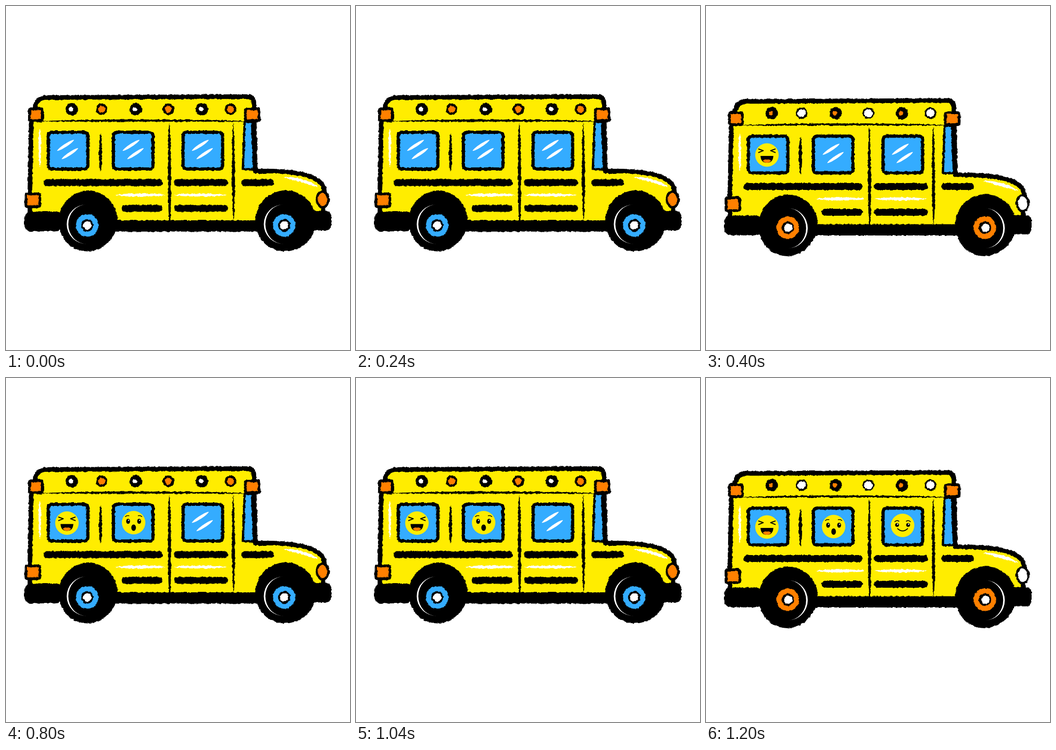
Write an HTML page that moves like this. It is 748 px wide and 748 px high and loops after 1600 ms.

```html
<!DOCTYPE html>
<html lang="en">
<head>
<meta charset="utf-8">
<title>School bus</title>
<style>
  html, body { margin: 0; width: 100%; height: 100%; overflow: hidden; background: #fff; }
  svg { display: block; width: 100vw; height: 100vh; }
</style>
</head>
<body>
<svg id="stage" viewBox="0 0 748 748"></svg>
<script>
const YELLOW = '#ffed00', BLUE = '#34acff', ORANGE = '#ff8000', WHITE = '#fff', BLACK = '#000';
const STEP = 400, DROP = 8.5;

const path = (d, fill, extra = '') => `<path d="${d}" fill="${fill}" ${extra}/>`;
const line = (d, width, color = BLACK) =>
  path(d, 'none', `stroke="${color}" stroke-width="${width}" stroke-linecap="round" stroke-linejoin="round"`);
const oval = (x, y, rx, ry, fill, extra = '') =>
  `<ellipse cx="${x}" cy="${y}" rx="${rx}" ry="${ry}" fill="${fill}" ${extra}/>`;
const disc = (x, y, r, fill) => oval(x, y, r, r, fill);
const box = (x, y, w, h, r, fill, border = 0) =>
  `<rect x="${x}" y="${y}" width="${w}" height="${h}" rx="${r}" fill="${fill}" stroke="${BLACK}" stroke-width="${border}"/>`;

// Brush mark that keeps its width along most of its length and tapers at both ends.
function brush(x1, y1, x2, y2, width, color = BLACK, bow = 0) {
  const dx = x2 - x1, dy = y2 - y1, length = Math.hypot(dx, dy);
  const at = (t, offset) => `${x1 + dx * t - dy / length * offset} ${y1 + dy * t + dx / length * offset}`;
  const side = width * 2 / 3;
  return path(`M${x1} ${y1}C${at(.12, bow + side)} ${at(.88, bow + side)} ${x2} ${y2}` +
    `C${at(.88, bow - side)} ${at(.12, bow - side)} ${x1} ${y1}Z`, color);
}

function body(lit) {
  const lamps = [143, 208, 282, 353, 426, 488].map((x, i) => {
    const small = i % 2 === 0;
    const color = small === lit ? ORANGE : WHITE;
    const radius = small ? 4.8 : lit ? 9 : 7.5;
    return disc(x, 224.5, small ? 13.5 : 12.5, BLACK) + disc(small ? x - 2 : x, 224.5, radius, color);
  }).join('');
  const panes = [92, 233.5, 385].map(x => box(x, 274.5, 86, 80, 8, BLUE, 7)).join('');
  const strips = [[89, 333, 384], [373, 475, 384], [519, 575, 384], [259, 333, 440], [373, 475, 440]]
    .map(([x1, x2, y]) => line(`M${x1} ${y}H${x2}`, 15)).join('');
  return path('M52 460V400L55 250L63 236V222Q66 201 84 199L290 198L525 197Q539 198 539 212' +
      'L542 359H580Q652 361 678 379Q695 392 692 412L688 460L540 478H240Z', YELLOW,
      `stroke="${BLACK}" stroke-width="10" stroke-linejoin="round"`) +
    path('M519 252H535L539 355H515Z', BLUE, `stroke="${BLACK}" stroke-width="5" stroke-linejoin="round"`) +
    brush(76, 251, 525, 251, 5, BLACK, -2.5) +
    lamps + panes + strips +
    brush(205.5, 277, 205.5, 359, 7) +
    brush(355, 254, 356, 490, 6.5) +
    brush(494, 254, 495, 468, 6.5) +
    brush(73.5, 267, 73.5, 351, 5.5, WHITE) +
    brush(239, 411, 347, 411, 6.5, WHITE) +
    brush(365, 411, 480, 411, 6.5, WHITE) +
    brush(603, 373, 679, 394, 6.5, WHITE, -5) +
    box(51, 223.5, 28, 26, 3, ORANGE, 6) +
    box(520.5, 223.5, 30, 26, 3, ORANGE, 6) +
    box(43.5, 408.5, 30, 28, 3, ORANGE, 6) +
    oval(688.5, 420.5, 12.5, 17, lit ? WHITE : ORANGE, `stroke="${BLACK}" stroke-width="5"`) +
    disc(179, 466, 64, BLACK) + disc(608, 467, 66, BLACK) +
    box(225, 466, 335, 24.5, 6, BLACK) +
    box(40, 447, 82, 43, 14, BLACK) +
    box(650, 446, 58, 42, 13, BLACK);
}

const wheel = (x, lit) => lit
  ? disc(x, 483, 61, BLACK) + disc(x + 1.5, 482, 24.5, ORANGE) + disc(x + 1.5, 482, 13.5, BLACK) + disc(x + 2.5, 482, 9, WHITE)
  : disc(x, 472.5, 61, BLACK) + disc(x, 477, 24.5, BLUE) + disc(x, 477, 13.5, BLACK) + disc(x, 477, 9, WHITE);

const tyreShine = (x, lit) => lit
  ? path(`M${x} 439.5A43.5 43.5 0 0 1 ${x} 527A40 43.5 0 0 0 ${x} 439.5Z`, WHITE)
  : path(`M${x - 2} 431.5A43.5 43 0 0 0 ${x - 2} 517.5A40 43 0 0 1 ${x - 2} 431.5Z`, WHITE);

const glint = x => brush(x - 20, 315, x + 17, 291, 6.5, WHITE) + brush(x - 10, 333, x + 26, 309, 6.5, WHITE);

// Faces are drawn around their own centre.
const faces = [
  line('M-18 -13L-8 -9.5L-18 -5.5M18 -13L8 -9.5L18 -5.5', 2.2) +
    path('M-14 2H14Q13 17 0 17T-14 2Z', BLACK) +
    path('M-9 12.5Q-5 8 0 10Q5 8 9 12.5Q5 17 0 17T-9 12.5Z', ORANGE),
  oval(-12, -3, 4.2, 5.5, BLACK) + oval(12, -3, 4.2, 5.5, BLACK) +
    disc(-11, -5, 1.3, WHITE) + disc(13, -5, 1.3, WHITE) +
    oval(0, 11, 5, 7, BLACK) +
    line('M-18 -13Q-15 -16 -10 -15M18 -13Q15 -16 10 -15', 1.6),
  disc(-12, -1, 4.3, BLACK) + disc(12, -1, 4.3, BLACK) +
    disc(-11, -2.5, 1.4, WHITE) + disc(13, -2.5, 1.4, WHITE) +
    line('M-17 -8Q-13 -12 -8 -9M17 -8Q13 -12 8 -9M-11 7Q0 17 11 7', 1.7)
];
const seats = [[132.5, 315.5], [277.5, 314.5], [427.5, 312]];
const glintCentres = [131, 273.5, 424];

const face = i => `<g transform="translate(${seats[i]})">${disc(0, 0, 25.5, YELLOW)}${faces[i]}</g>`;

const rough = seed => `<filter id="rough${seed}" filterUnits="userSpaceOnUse" x="0" y="0" width="748" height="748"
  color-interpolation-filters="sRGB"><feTurbulence type="fractalNoise" baseFrequency=".16" numOctaves="3" seed="${seed}"/>
  <feDisplacementMap in="SourceGraphic" scale="4.5" xChannelSelector="R" yChannelSelector="G"/></filter>`;

function scene(step) {
  const lit = step % 2 === 1;
  const shift = `transform="translate(0 ${lit ? DROP : 0})"`;
  const windows = seats.map((_, i) => i < step ? face(i) : glint(glintCentres[i])).join('');
  return `<g class="scene" visibility="hidden">
    <g filter="url(#rough${lit ? 2 : 1})"><g ${shift}>${body(lit)}</g>${wheel(176.5, lit)}${wheel(605, lit)}</g>
    ${tyreShine(177.5, lit)}${tyreShine(606, lit)}
    <g ${shift}>${windows}</g></g>`;
}

const stage = document.getElementById('stage');
stage.innerHTML = `<defs>${rough(1)}${rough(2)}</defs>` + [0, 1, 2, 3].map(scene).join('');
const scenes = [...stage.querySelectorAll('.scene')];

function show(now) {
  const current = Math.floor(now / STEP) % scenes.length;
  scenes.forEach((s, i) => s.setAttribute('visibility', i === current ? 'visible' : 'hidden'));
}
const start = performance.now();
function tick() {
  show(performance.now() - start);
  requestAnimationFrame(tick);
}
show(0);
requestAnimationFrame(tick);
</script>
</body>
</html>
```
